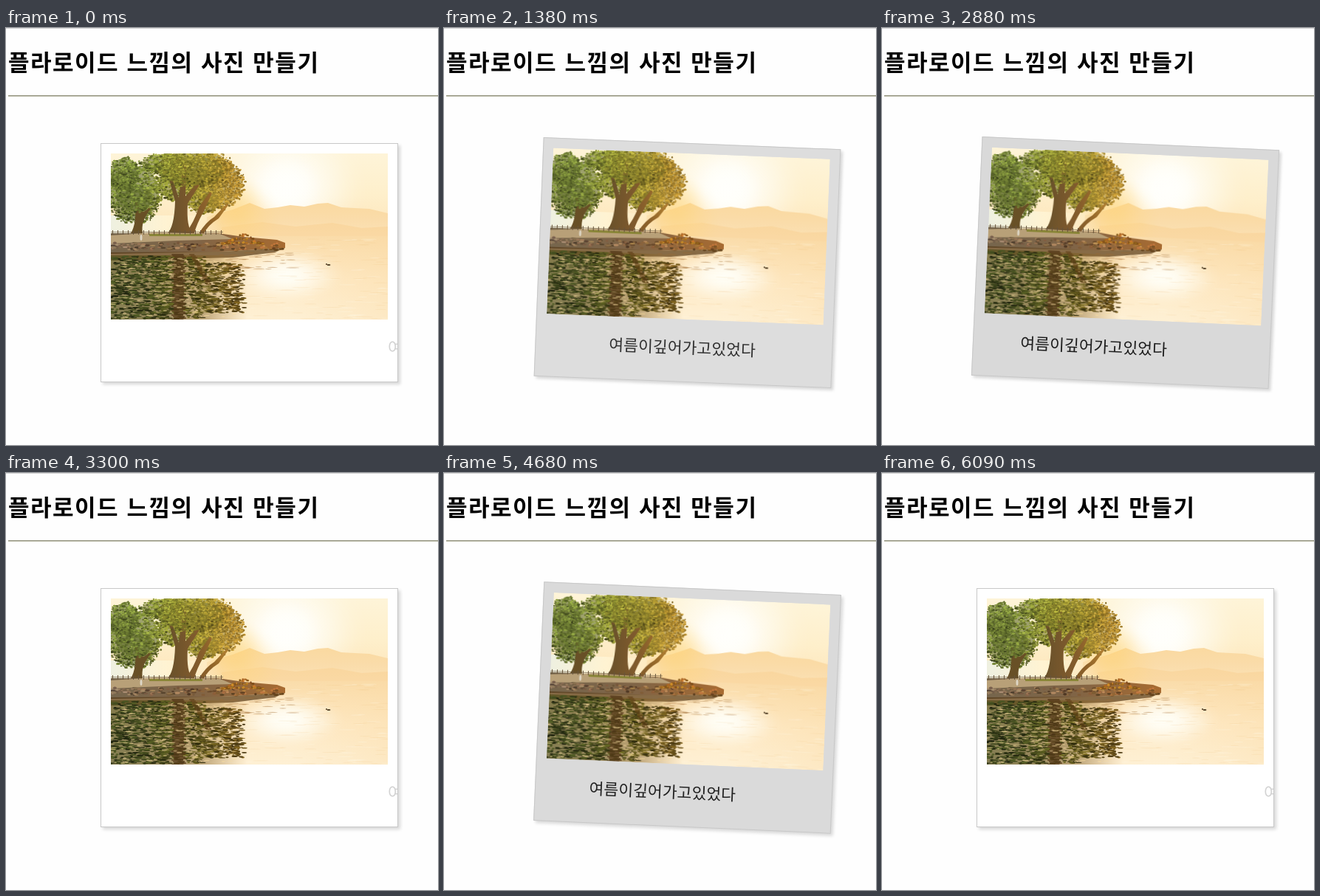
Animation, 585 px wide and 565 px high, one loop 7.59 s. Source, as an HTML page with a canvas:

```html
<!DOCTYPE html>
<html lang="ko">
<head>
<meta charset="utf-8">
<title>플라로이드 느낌의 사진 만들기</title>
<style>
  html, body { margin: 0; width: 100%; height: 100%; overflow: hidden; background: #fefefe; }
  body { position: relative; font-family: "Noto Sans CJK KR", "Noto Sans CJK", "Noto Sans CJK JP", sans-serif; }
  body::before { content: ""; position: absolute; left: 0; right: 0; top: 0; height: 1px; background: #d6d6d6; }
  h1 {
    position: absolute; left: 3px; top: 25px; margin: 0; white-space: nowrap; color: #000;
    font-size: 31px; line-height: 40px; font-weight: 700; letter-spacing: 1.5px; word-spacing: .2px;
  }
  hr {
    position: absolute; left: 3px; right: 0; top: 91px; height: 0; margin: 0;
    border: 0; border-top: 1px solid #9a9a88; border-bottom: 1px solid #b9b9a6;
  }
  .card {
    position: absolute; left: 128px; top: 156px; width: 403px; height: 324px; box-sizing: border-box;
    border: 1px solid #c8c8c8; background: #fff; box-shadow: 3px 3px 4px #d8d8d8; overflow: hidden;
  }
  canvas { position: absolute; left: 13px; top: 13px; }
  .card p {
    position: absolute; left: 13px; top: 260px; width: 375px; margin: 0; white-space: nowrap;
    font-size: 21.6px; line-height: 30px; font-weight: 300;
  }
</style>
</head>
<body>
<h1>플라로이드 느낌의 사진 만들기</h1>
<hr>
<div class="card">
  <canvas width="375" height="225"></canvas>
  <p>여름이깊어가고있었다</p>
</div>
<script>
const card = document.querySelector('.card');
const caption = card.querySelector('p');
const g = card.querySelector('canvas').getContext('2d');

// ---- photo ----
let seed = 11;
const rnd = () => (seed = (seed * 16807) % 2147483647) / 2147483647;
const span = (a, b) => a + (b - a) * rnd();

function linear(x0, y0, x1, y1, ...colors) {
  const grad = g.createLinearGradient(x0, y0, x1, y1);
  colors.forEach((c, i) => grad.addColorStop(i / (colors.length - 1), c));
  return grad;
}
function rect(x, y, w, h, fill) {
  g.fillStyle = fill;
  g.fillRect(x, y, w, h);
}
function glow(x, y, r, rgb, a, flat = 1) {
  const grad = g.createRadialGradient(0, 0, 0, 0, 0, r);
  for (let i = 0; i <= 8; i++) {
    grad.addColorStop(i / 8, `rgba(${rgb},${a * (1 - (i / 8) ** 2) ** 2})`);
  }
  g.save();
  g.translate(x, y);
  g.scale(1, flat);
  g.fillStyle = grad;
  g.fillRect(-r, -r, 2 * r, 2 * r);
  g.restore();
}
function shape(path, fill) {
  g.fillStyle = fill;
  g.fill(new Path2D(path));
}
function dab(x, y, rx, ry, fill) {
  g.fillStyle = fill;
  g.beginPath();
  g.ellipse(x, y, rx, ry, 0, 0, 7);
  g.fill();
}
// Green on the left turns to gold towards the sun.
function leafColor(x, light, alpha = 1) {
  const k = Math.min(1, Math.max(0, (x - 35) / 130));
  return `hsla(${72 - 30 * k},${42 + 18 * k}%,${light + 6 * k}%,${alpha})`;
}
function foliage(cx, cy, rx, ry, n) {
  dab(cx, cy, rx * .88, ry * .88, leafColor(cx, 30, .6));
  for (let i = 0; i < n; i++) {
    const a = span(0, 6.283), r = Math.sqrt(rnd()) * span(.9, 1.06);
    const x = cx + rx * r * Math.cos(a), y = cy + ry * r * Math.sin(a);
    const light = span(20, 48) - 6 * Math.sin(a) * r;
    dab(x, y, span(.8, 2.4), span(.6, 1.6), leafColor(x, light));
  }
}
function ripples(x0, x1, y0, y1, n) {
  for (let i = 0; i < n; i++) {
    const y = span(y0, y1), x = span(x0, x1 + 4 * Math.sin(y));
    dab(x, y, span(1.5, 5), span(.5, 1.3), leafColor(x, span(9, 28)));
  }
}

function paint() {
  rect(0, 0, 375, 113, linear(0, 0, 0, 113, '#fef4d8', '#feefcb', '#fde4b8'));
  glow(238, 46, 110, '255,255,250', 1, .85);
  glow(238, 46, 50, '255,255,252', .8);
  shape('M130 86 L165 76 188 67 208 75 226 73 243 70 262 72 280 68 294 67 312 73 330 74 350 75 375 81 V114 H130Z',
    linear(0, 67, 0, 113, '#fad9a0', '#fadcaa', '#fbe2b6'));
  shape('M150 100 L205 93 250 99 300 94 340 101 375 99 V114 H150Z', 'rgba(247,202,138,.4)');
  glow(175, 92, 60, '255,214,130', .5);
  rect(0, 84, 150, 29, linear(0, 0, 150, 0, '#eef0e0', '#fff3d2', 'rgba(255,243,210,0)'));

  rect(0, 112, 375, 113, linear(0, 112, 0, 225, '#fadcaa', '#fee9c4', '#fef0d4'));
  rect(250, 112, 125, 113, linear(250, 0, 375, 0, 'rgba(250,216,160,0)', 'rgba(250,216,160,.3)'));
  glow(238, 165, 80, '255,255,248', .95, .5);
  for (let i = 0; i < 150; i++) {
    dab(span(170, 375), span(116, 224), span(4, 14), .5,
      i % 2 ? 'rgba(255,250,230,.35)' : 'rgba(240,195,125,.18)');
  }
  dab(295, 151, 2.5, 1, '#4b3a22');
  dab(292, 150, 1, 1, '#4b3a22');

  // trees
  foliage(32, 54, 38, 42, 1100);
  foliage(18, 28, 22, 24, 300);
  foliage(70, 14, 31, 14, 400);
  foliage(112, 21, 55, 28, 1300);
  foliage(86, 42, 24, 23, 400);
  foliage(145, 42, 36, 33, 1000);
  foliage(126, 62, 26, 20, 400);
  const bark = linear(75, 0, 150, 0, '#66502a', '#7f5a2d', '#966626');
  shape('M76 109 Q86 100 87 65 L79 35 83 34 92 60 98 15 102 15 101 58 118 38 121 41 104 68 Q102 100 111 109Z', bark);
  shape('M101 108 Q113 93 119 73 L134 52 137 54 125 80 Q116 96 113 108Z', bark);
  shape('M119 109 Q128 93 140 86 L157 68 159 70 146 88 Q130 98 126 109Z', bark);
  shape('M27 108 Q35 96 33 66 L37 66 Q38 88 52 73 L54 75 Q40 92 43 108Z', '#685026');
  foliage(112, 24, 48, 22, 350);
  foliage(32, 60, 28, 20, 150);
  glow(165, 65, 45, '255,205,90', .25);

  // shore and its stones
  shape('M0 108 H145 L180 113 225 117 236 121 V128 L150 133 0 136Z',
    linear(0, 0, 236, 0, '#76664d', '#806446', '#a86b31'));
  shape('M0 111 L60 107 148 109 165 116 90 118 0 122Z', '#b8a078');
  rect(52, 109, 72, 3, '#8a8638');
  for (let i = 0; i < 160; i++) {
    const x = span(0, 232), y = span(121, 131);
    dab(x, y, span(1.5, 3.5), span(.8, 1.8), `hsl(${span(25, 36)},${22 + x / 7}%,${span(22, 58)}%)`);
  }
  for (let i = 0; i < 110; i++) {
    const x = span(150, 207);
    dab(x, 122 - span(0, 13) * Math.sin((x - 150) / 18.2) ** 2, span(.8, 2.4), span(.7, 1.7),
      `hsl(${span(27, 40)},66%,${span(28, 50)}%)`);
  }
  for (let x = 2; x < 152; x += 7) rect(x, 104, 1, 6, '#67543a');
  rect(0, 106, 152, 1, 'rgba(100,80,55,.6)');
  dab(41, 114, 1.5, 4, '#ded6c6');

  // reflections
  shape('M0 134 L150 133 236 128 222 134 165 141 0 145Z', 'rgba(86,58,23,.7)');
  rect(0, 138, 185, 87, linear(0, 0, 185, 0,
    'rgba(80,77,28,.7)', 'rgba(95,80,28,.65)', 'rgba(125,92,32,.5)', 'rgba(170,117,45,0)'));
  ripples(0, 76, 139, 224, 700);
  ripples(62, 126, 140, 224, 500);
  ripples(118, 177, 148, 216, 520);
  for (let y = 136; y < 225; y += 2) {
    rect(84 + 2 * Math.sin(y), y, 16, 2, 'rgba(84,56,24,.75)');
    if (y < 178) rect(107 + (y - 136) * .55 + Math.sin(y), y, 7, 2, 'rgba(96,62,22,.6)');
  }
  for (let i = 0; i < 230; i++) {
    dab(span(0, 172), span(142, 224), span(1.5, 5), span(.4, 1), 'rgba(250,222,160,.55)');
  }
  for (let i = 0; i < 35; i++) {
    dab(span(150, 250), span(134, 157), span(3, 9), .6, 'rgba(160,105,45,.4)');
  }
}

// ---- motion ----
const LOOP = 7590, TICK = 30, DURATION = 500;
// start of each turn and the state it leads to
const turns = [[1152, 1], [2820, 0], [4417, 1], [5610, 0]];

// cubic-bezier(.25, .1, .25, 1)
function ease(x) {
  if (x <= 0) return 0;
  if (x >= 1) return 1;
  let lo = 0, hi = 1;
  const curve = (s, a, b) => 3 * a * s * (1 - s) ** 2 + 3 * b * s * s * (1 - s) + s ** 3;
  for (let i = 0; i < 24; i++) {
    const mid = (lo + hi) / 2;
    if (curve(mid, .25, .25) < x) lo = mid; else hi = mid;
  }
  return curve(lo, .1, 1);
}
function progress(t) {
  let p = 0;
  for (const [start, to] of turns) {
    if (t < start) break;
    const e = ease((t - start) / (DURATION - TICK / 2));
    p = to ? e : 1 - e;
  }
  return p;
}
function gray(from, to, p) {
  const v = Math.round(from + (to - from) * p);
  return `rgb(${v},${v},${v})`;
}
function pose(t) {
  const p = progress(Math.floor(t / TICK) * TICK);
  card.style.transform = p ? `rotate(${3 * p}deg)` : 'none';
  card.style.backgroundColor = gray(255, 211, p);
  caption.style.color = gray(211, 0, p);
  caption.style.textIndent = `${100 * (1 - p)}%`;
}

paint();
pose(0);
const begin = performance.now();
function frame() {
  pose((performance.now() - begin) % LOOP);
  requestAnimationFrame(frame);
}
requestAnimationFrame(frame);
</script>
</body>
</html>
```
